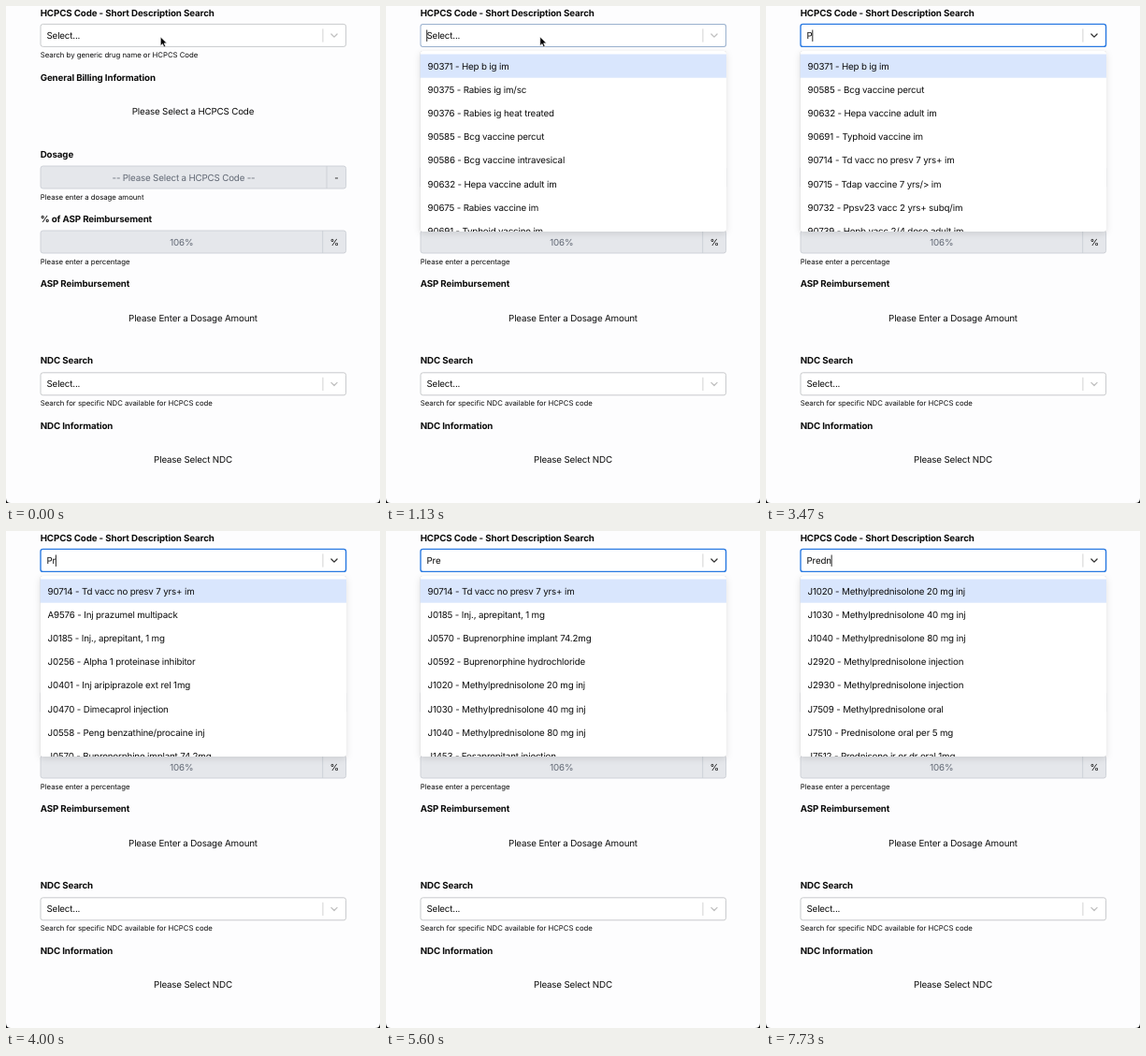
These frames come from a looping animation (400 px wide and 531 px high, 8 s). An HTML page:

```html
<!DOCTYPE html>
<html lang="en">
<head>
<meta charset="utf-8">
<title>Code search form</title>
<style>
html, body { margin: 0; height: 100%; overflow: hidden; background: #fdfdfe; }
svg { display: block; width: 100vw; height: 100vh; }
text { font: 9.75px Inter, Roboto, sans-serif; letter-spacing: -.016em; fill: #0c0c0c; white-space: pre; text-rendering: geometricPrecision; }
.head { font-weight: 700; letter-spacing: -.012em; }
.note { font-size: 7.8px; letter-spacing: -.005em; }
.mid { text-anchor: middle; }
.dim { fill: #626975; }
.box { fill: #fff; stroke: #c2c4c7; stroke-width: .9; }
.off { fill: #e5e7eb; stroke: #cbcfd5; stroke-width: .9; }
.sep { stroke: #c8c8c8; stroke-width: .8; }
.chev { fill: none; stroke: #c0c0c0; stroke-width: 1.3; stroke-linecap: round; stroke-linejoin: round; }
#list { filter: drop-shadow(0 0 .5px rgba(0,0,0,.25)) drop-shadow(0 2.5px 3.5px rgba(0,0,0,.11)); }
</style>
</head>
<body>
<svg id="stage" viewBox="0 0 400 531" preserveAspectRatio="none">
  <defs><clipPath id="clip"><rect x="36.6" y="48" width="327.4" height="193" rx="2.5"/></clipPath></defs>
  <g id="form"></g>
  <rect id="ring" x="37" y="19.4" width="326.6" height="24" rx="2.5" class="box"/>
  <path class="sep" d="M338.9 24.4v14.2"/>
  <path id="arrow" class="chev" d="M347.9 30l3.1 3.1 3.1-3.1"/>
  <text id="query" x="43.5" y="35"></text>
  <rect id="caret" y="25.5" width=".9" height="12.4" fill="#111"/>
  <g id="list">
    <rect x="36.6" y="48" width="327.4" height="193" rx="2.5" fill="#fff"/>
    <rect x="36.6" y="51.5" width="327.4" height="25.2" fill="#d9e6fd"/>
    <g id="items" clip-path="url(#clip)"></g>
  </g>
  <path id="mouse" d="M0 0V9.4L2.2 7.4 3.7 10.9 5.3 10.2 3.8 6.8H6.8Z" fill="#000" stroke="#fff" stroke-width=".6"/>
  <path d="M0 526q0 5 5 5H0ZM400 526q0 5-5 5h5Z" fill="#111"/>
</svg>
<script>
const $ = id => document.getElementById(id);
const text = (x, y, s, cls = '') => `<text x="${x}" y="${y}" class="${cls}">${s}</text>`;
const field = (y, split, label, unit) =>
  `<rect class="off" x="37" y="${y}" width="326.6" height="24" rx="2.5"/>` +
  `<path class="off" d="M${split} ${y}v24"/>` +
  text((37 + split) / 2, y + 15.5, label, 'mid dim') +
  text((split + 363.6) / 2, y + 15.5, unit, 'mid');

const heads = [[7, 'HCPCS Code - Short Description Search'], [76, 'General Billing Information'],
  [158.5, 'Dosage'], [227.5, '% of ASP Reimbursement'], [296.5, 'ASP Reimbursement'],
  [378.5, 'NDC Search'], [448, 'NDC Information']];
const notes = [[52.5, 'Search by generic drug name or HCPCS Code'], [204, 'Please enter a dosage amount'],
  [273, 'Please enter a percentage'], [424, 'Search for specific NDC available for HCPCS code']];
const prompts = [[112.5, 'Please Select a HCPCS Code'], [333, 'Please Enter a Dosage Amount'],
  [484, 'Please Select NDC']];

$('form').innerHTML =
  heads.map(([y, s]) => text(36.7, y + 3.5, s, 'head')).join('') +
  notes.map(([y, s]) => text(36.8, y + 2.8, s, 'note')).join('') +
  prompts.map(([y, s]) => text(200, y + 3.5, s, 'mid')).join('') +
  field(171, 343, '-- Please Select a HCPCS Code --', '-') +
  field(240, 338.7, '106%', '%') +
  '<rect class="box" x="37" y="391.8" width="326.6" height="24" rx="2.5"/>' +
  '<path class="sep" d="M338.9 396.8v14.2"/><path class="chev" d="M347.9 402.4l3.1 3.1 3.1-3.1"/>' +
  text(43.5, 407.4, 'Select...');

const options = `90371 - Hep b ig im
90375 - Rabies ig im/sc
90376 - Rabies ig heat treated
90585 - Bcg vaccine percut
90586 - Bcg vaccine intravesical
90632 - Hepa vaccine adult im
90675 - Rabies vaccine im
90691 - Typhoid vaccine im
90714 - Td vacc no presv 7 yrs+ im
90715 - Tdap vaccine 7 yrs/&gt; im
90732 - Ppsv23 vacc 2 yrs+ subq/im
90739 - Hepb vacc 2/4 dose adult im
A9576 - Inj prazumel multipack
J0185 - Inj., aprepitant, 1 mg
J0256 - Alpha 1 proteinase inhibitor
J0401 - Inj aripiprazole ext rel 1mg
J0470 - Dimecaprol injection
J0558 - Peng benzathine/procaine inj
J0570 - Buprenorphine implant 74.2mg
J0592 - Buprenorphine hydrochloride
J1020 - Methylprednisolone 20 mg inj
J1030 - Methylprednisolone 40 mg inj
J1040 - Methylprednisolone 80 mg inj
J1453 - Fosaprepitant injection
J2920 - Methylprednisolone injection
J2930 - Methylprednisolone injection
J7509 - Methylprednisolone oral
J7510 - Prednisolone oral per 5 mg
J7512 - Prednisone ir or dr oral 1mg`.split('\n');

const LOOP = 8000, FOCUS = 1105, BLINK = 500;
const keys = [3340, 3960, 4060, 6500, 7710];   // key presses that type the word
const word = 'Predn';
const clamp = v => Math.max(0, Math.min(1, v));
const mix = (a, b, p) => `rgb(${a.map((v, i) => v + (b[i] - v) * p)})`;
let shown = null;

function setQuery(q) {
  if (q === shown) return;
  shown = q;
  $('query').textContent = q || 'Select...';
  $('items').innerHTML = options
    .filter(o => o.toLowerCase().includes(q.toLowerCase()))
    .slice(0, 8)
    .map((o, i) => text(44.5, 67.5 + i * 25.23, o)).join('');
}

function draw(t) {
  const typed = keys.filter(k => t >= k).length;
  const open = t >= FOCUS;
  setQuery(word.slice(0, typed));

  const p = clamp((t - FOCUS) / 100);
  $('ring').style.stroke = mix([194, 196, 199], [42, 122, 226], p);
  $('ring').style.strokeWidth = .9 + .5 * p;
  $('arrow').style.stroke = mix([192, 192, 192], [50, 50, 50], clamp((t - FOCUS - 30) / 120));

  const since = t - (typed ? keys[typed - 1] : FOCUS);
  const lit = open && Math.floor(since / BLINK) % 2 === 0;
  $('caret').setAttribute('visibility', lit ? 'visible' : 'hidden');
  $('caret').setAttribute('x', 43.3 + (typed ? $('query').getComputedTextLength() : 0));
  $('list').setAttribute('visibility', open ? 'visible' : 'hidden');

  $('mouse').setAttribute('visibility', typed ? 'hidden' : 'visible');
  $('mouse').setAttribute('transform', `translate(${t < 800 ? 165.3 : 164.8} 33)`);
}

function tick(now) {
  draw(now % LOOP);
  requestAnimationFrame(tick);
}
draw(0);
requestAnimationFrame(tick);
</script>
</body>
</html>
```
